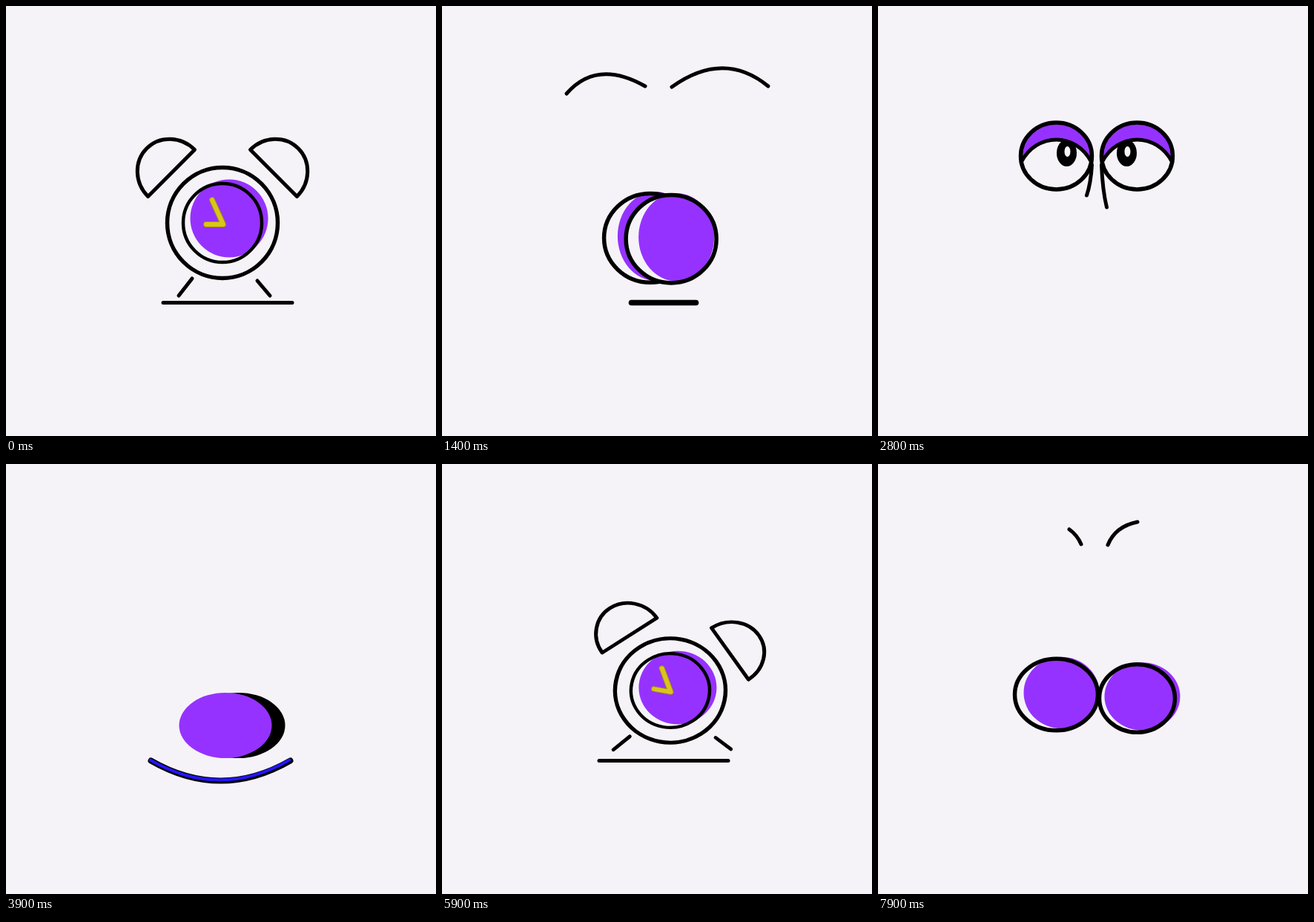
Write an HTML page with a canvas that moves like this. It is 580 by 579 pixels and loops after 8000 ms.

```html
<!DOCTYPE html>
<html lang="en">
<head>
<meta charset="utf-8">
<title>Alarm clock</title>
<style>
html, body { margin: 0; width: 100%; height: 100%; overflow: hidden; background: #f5f3f7; }
canvas { display: block; }
</style>
</head>
<body>
<canvas id="stage" width="580" height="579"></canvas>
<script>
const g = document.getElementById('stage').getContext('2d');
const LOOP = 8000, CYCLE = 6300, STEP = 100;
const EYES_AT = 1400, BALL_AT = 3500, HIT_AT = 3900, CLOCK_AT = 5400;
const PAPER = '#f5f3f7', PURPLE = '#9632ff', INK = '#000';
const RAD = Math.PI / 180, GROUND = 399.5, LINE_HALF = 87;

const HOPS = [
  { start: 0, time: 600, height: 100, lean: -45 },
  { start: 600, time: 700, height: 58.5, lean: 23 },
  { start: CLOCK_AT, time: 900, height: 95, lean: 11.5 }
];

// Each brow: outer tip, control point, inner end.
const BROWS = {
  '-1': [258, 88, 269, 96, 274, 108],
  '1': [350, 78, 320, 84, 310, 109]
};

const clamp = v => Math.min(1, Math.max(0, v));
const mix = (a, b, p) => a + (b - a) * p;

function ease(t, from, to) {
  const p = clamp((t - from) / (to - from));
  return p * p * (3 - 2 * p);
}

function stroke(width, color = INK) {
  g.lineWidth = width;
  g.strokeStyle = color;
  g.stroke();
}

function fill(color) {
  g.fillStyle = color;
  g.fill();
}

function oval(x, y, rx, ry = rx) {
  g.beginPath();
  g.ellipse(x, y, rx, ry, 0, 0, Math.PI * 2);
}

function curve([x1, y1, cx, cy, x2, y2], width, color) {
  g.beginPath();
  g.moveTo(x1, y1);
  g.quadraticCurveTo(cx, cy, x2, y2);
  stroke(width, color);
}

function rotated(deg, draw) {
  g.save();
  g.rotate(deg * RAD);
  draw();
  g.restore();
}

// A hop rises, then dips below rest; the dip squashes the clock.
function clockPose(t) {
  const hop = HOPS.find(h => t >= h.start && t < h.start + h.time);
  if (!hop) return { lift: 0, tilt: 0 };
  const p = (t - hop.start) / hop.time;
  const wave = Math.sin(2 * Math.PI * p);
  return {
    lift: hop.height * wave * (wave < 0 ? .4 : 1),
    tilt: hop.lean * Math.sin(Math.PI * p) ** 3
  };
}

function drawLeg(x1, y1, x2, y2) {
  g.beginPath();
  g.moveTo(x1, y1);
  g.lineTo(x2, y2);
  stroke(5);
}

function drawBell(side, x, y, size) {
  g.save();
  g.translate(side * x, y);
  g.rotate(side * 45 * RAD);
  g.beginPath();
  g.ellipse(0, 0, 44.5 * size, 47 * size, 0, Math.PI, 2 * Math.PI);
  g.closePath();
  g.restore();
  stroke(5);
}

function drawHands(turn) {
  const a = (turn - 24.5) * RAD;
  g.beginPath();
  g.moveTo(1 + 36 * Math.sin(a), 2 - 36 * Math.cos(a));
  g.lineTo(1, 2);
  g.lineTo(-22, 2);
  stroke(8, '#a18b20');
  stroke(6, '#dac51c');
}

function drawClock(t) {
  const { lift, tilt } = clockPose(t);
  const squash = 1 + Math.min(0, lift) * .0045;
  const splay = (1 - squash) * 190;
  const legTilt = tilt * clamp(lift / 60);
  const gap = t < CLOCK_AT ? 80 * ease(t, 1200, 1400) : 0;
  const grow = t < CLOCK_AT ? 1 : mix(.4, 1, ease(t, CLOCK_AT, CLOCK_AT + 200));
  const bellY = -67 * grow - gap * .6;

  g.save();
  g.translate(292 + tilt * 1.45, 292 - lift);
  g.scale(1, squash);
  rotated(legTilt + splay, () => drawLeg(-41 * grow, 75 * grow, -59 * grow, 98 * grow));
  rotated(legTilt - splay, () => drawLeg(47 * grow, 78 * grow, 64 * grow, 98 * grow));
  rotated(tilt, () => {
    drawBell(-1, 69 * grow + gap, bellY, grow);
    drawBell(1, 69 * grow + gap - Math.max(0, lift) * .15, bellY, grow);
    oval(9, -6, 52.5);
    fill(PURPLE);
    oval(0, 0, 74.5);
    stroke(5.5);
    oval(0, 0, 53);
    stroke(4.5);
    drawHands(lift * .45);
  });
  g.restore();
}

// Damped bouncing on the line; push is how hard the ball presses.
function ballPose(t) {
  const u = (t - HIT_AT) / 600;
  const settle = ease(t, 5100, CLOCK_AT);
  const height = 300 * .4 ** Math.max(0, u + .5) * Math.abs(Math.sin(Math.PI * u));
  const y = mix(352 - height, 290, settle);
  const push = clamp(1 - (352 - y) / 60);
  return { y, push, settle, force: push * .4 ** Math.max(0, u) };
}

function drawBall(t) {
  const { y, push, settle } = ballPose(t);
  const x = mix(296, 301, settle), rx = 50 + 12.5 * push, ry = 54 - 10 * push;
  oval(x + 18 * ease(t, BALL_AT - 100, BALL_AT + 150) * (1 - settle), y, rx, ry);
  fill(INK);
  oval(x, y, rx, ry);
  fill(PURPLE);
}

function drawLine(t) {
  const airborne = t >= BALL_AT && t < CLOCK_AT;
  const force = airborne ? ballPose(t).force : 0;
  const shown = 1 - ease(t, 1300, 1500) + ease(t, 3300, 3700);
  const half = (LINE_HALF - Math.max(0, clockPose(t).lift)) * shown + 7 * force;
  if (half < 1) return;
  const x = 299 - 9.5 * force, sag = 27 * force;
  const path = [x - half, GROUND, x, GROUND + sag * 2, x + half, GROUND];
  curve(path, 5 + 3 * Math.max(clamp(sag / 10), clamp((LINE_HALF - half) / 50)));
  if (sag > 3) {
    g.save();
    g.translate(-1, -1);
    curve(path, 4, '#2414f5');
    g.restore();
  }
}

// Split apart, rise, fly outwards, then gather into one ball.
function eyePose(t, side) {
  const split = ease(t, 1300, 1600), rise = ease(t, 1600, 2600);
  const fly = ease(t, 2900, 3200), gather = ease(t, 3200, BALL_AT);
  const spread = fly - gather, squeeze = Math.sin(Math.PI * rise);
  const skew = side * 2.5 * (1 - rise) * split;
  return {
    x: 295 + side * ((54.5 - 2.5 * squeeze) * split * (1 - gather) + 160 * spread),
    y: mix(313, 202, rise) + skew - 110 * gather - 141 * spread,
    rx: 53.5 - 5.5 * rise - skew + 11 * (1 - split) + 4 * gather,
    ry: 47 - 2 * rise + 5 * squeeze - skew / 2 + 13 * spread + 17 * (1 - split) + 8 * gather,
    open: rise * (1 - fly)
  };
}

function drawEye(t, side) {
  const { x, y, rx, ry, open } = eyePose(t, side);
  const shut = 1 - open ** 3;
  const edge = 1 - .82 * Math.cbrt(open);
  const middle = 1 - 1.49 * open ** 1.75;
  const w = rx * Math.sqrt(1 - edge * edge);
  const edgeY = edge * ry, pullY = (middle - edge / 4) / .75 * ry;
  const lid = () => g.bezierCurveTo(-w * .55, pullY, w * .55, pullY, w, edgeY);
  g.save();
  g.translate(x, y);

  if (middle < .7) {
    oval(-side * 14, -4, 13.5, 18);
    fill(INK);
    oval(1 - side * 14, -6, 4, 7);
    fill(PAPER);
  }

  g.save();
  g.beginPath();
  g.moveTo(-200, -200);
  g.lineTo(-200, edgeY);
  g.lineTo(-w, edgeY);
  lid();
  g.lineTo(200, edgeY);
  g.lineTo(200, -200);
  g.clip();
  oval(0, 0, rx, ry);
  fill(PAPER);
  oval(7 * shut, -2.5 * shut, Math.min(rx, 51), ry);
  fill(PURPLE);
  g.restore();

  if (open > .01) {
    g.beginPath();
    g.moveTo(-w, edgeY);
    lid();
    stroke(5);
  }
  oval(0, 0, rx, ry);
  stroke(5.5);
  g.restore();
}

// The bells' arcs become brows, then drop to form the nose.
function drawBrow(t, side) {
  const length = (49 + 8 * side) * (1 - ease(t, 2800, 3000));
  if (length < 1) return;
  const { x, y, rx, open } = eyePose(t, side);
  const early = 1 - ease(t, EYES_AT, 1600);
  const [tipX, tipY, midX, midY, endX, endY] = BROWS[side];
  const brow = [tipX + side * 90 * early, tipY + 30 * early, midX + side * 60 * early, midY - 25 * early, endX, endY];
  const topX = x - side * rx, topY = y + 12, sway = side * (18 - 11 * open);
  const nose = [topX, topY, topX + sway * .2, topY + length * .6, topX + sway, topY + length];
  const fall = ease(t, 1600, 1900);
  curve(brow.map((v, i) => mix(v, nose[i], fall)), 5);
}

function drawFace(t) {
  for (const side of [-1, 1]) drawBrow(t, side);
  for (const side of [-1, 1]) drawEye(t, side);
}

function frame(now) {
  const t = Math.floor((now % LOOP) / STEP) * STEP % CYCLE;
  g.fillStyle = PAPER;
  g.fillRect(0, 0, 580, 579);
  g.lineCap = g.lineJoin = 'round';
  drawLine(t);
  if (t < EYES_AT || t >= CLOCK_AT) drawClock(t);
  else if (t < BALL_AT) drawFace(t);
  else drawBall(t);
  requestAnimationFrame(frame);
}
requestAnimationFrame(frame);
</script>
</body>
</html>
```
